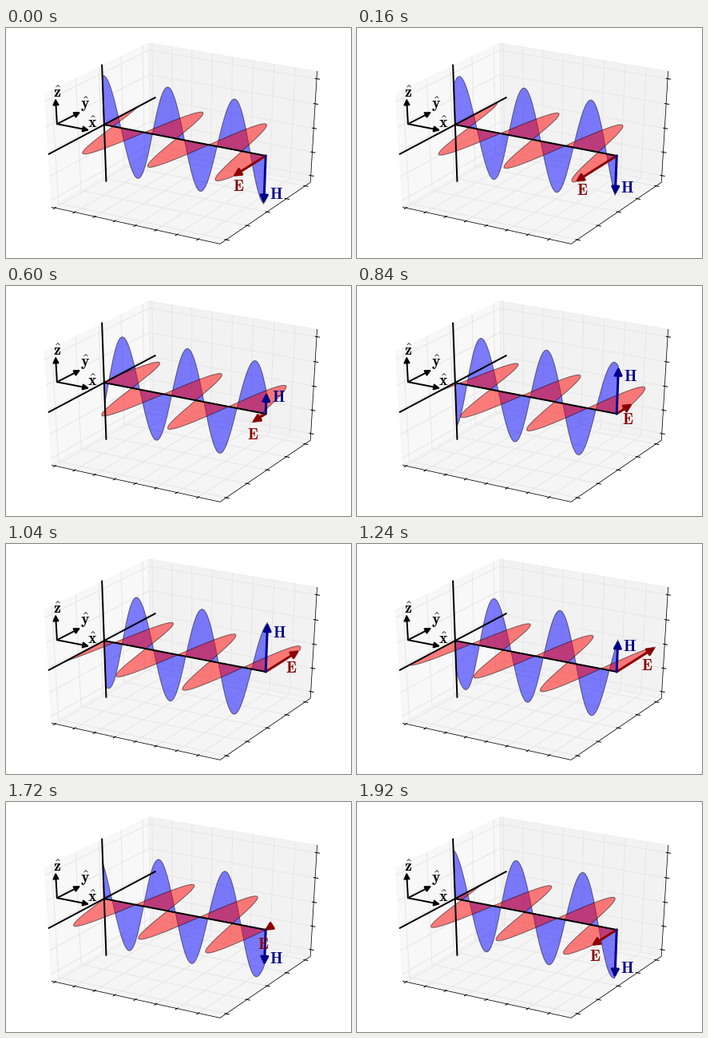
Animation, 432 px wide and 288 px high, one loop 1.96 s. Source, as a matplotlib script:

```python
import numpy as np
import matplotlib.pyplot as plt
from matplotlib.animation import FuncAnimation
from matplotlib.patches import FancyArrowPatch, Polygon

plt.rcParams["mathtext.fontset"] = "cm"

FRAMES, STEPS = 49, 50          # the loop skips one step of a full period
LENGTH, LIMIT = 5 * np.pi, 1.1  # x runs 0..LENGTH, y and z run -LIMIT..LIMIT
DIST = 10
ELEV, AZIM = np.radians([30, -60])


def project(x, y, z):
    """Perspective view of the box, scaled to a unit cube."""
    x = np.asarray(x) / LENGTH - 0.5
    y = np.asarray(y) / (2 * LIMIT)
    z = np.asarray(z) / (2 * LIMIT)
    right = -x * np.sin(AZIM) + y * np.cos(AZIM)
    near = x * np.cos(AZIM) + y * np.sin(AZIM)
    up = z * np.cos(ELEV) - near * np.sin(ELEV)
    depth = DIST - near * np.cos(ELEV) - z * np.sin(ELEV)
    return np.array([right / depth, up / depth])


fig = plt.figure(figsize=(6, 4), dpi=72, facecolor="white")
ax = fig.add_axes([0, 0, 1, 1])
ax.set(xlim=(-0.095, 0.09), ylim=(-0.095, 0.09))
ax.axis("off")


def line(*points, color="black", lw=1.0, zorder=1.0):
    ax.plot(*project(*np.transpose(points)), color=color, lw=lw,
            zorder=zorder, solid_capstyle="projecting")


def pane(grey, *points):
    ax.add_patch(Polygon(project(*np.transpose(points)).T, facecolor=str(grey),
                         edgecolor=str(grey), lw=1, alpha=0.5, zorder=0))


def arrow(start, end, color, lw, scale, zorder):
    patch = FancyArrowPatch(project(*start), project(*end), arrowstyle="-|>",
                            mutation_scale=scale, lw=lw, color=color,
                            shrinkA=0, shrinkB=0, zorder=zorder)
    return ax.add_patch(patch)


def label(text, point, offset, color="black", va="baseline"):
    return ax.annotate(text, project(*point), offset, textcoords="offset points",
                       size=20, color=color, ha="center", va=va, zorder=8)


# Box: panes, grid, edges and ticks
x0, x1 = -LENGTH / 48, LENGTH * 49 / 48
lo, hi = -LIMIT * 25 / 24, LIMIT * 25 / 24
pane(0.95, (x0, lo, lo), (x0, hi, lo), (x0, hi, hi), (x0, lo, hi))
pane(0.90, (x0, hi, lo), (x1, hi, lo), (x1, hi, hi), (x0, hi, hi))
pane(0.925, (x0, lo, lo), (x1, lo, lo), (x1, hi, lo), (x0, hi, lo))

dx, dy = LENGTH / 12, 2 * LIMIT / 12
grid = dict(color="0.9", lw=1, zorder=0.5)
for t in np.arange(0, 15, 2):
    line((t, lo, lo), (t, hi, lo), (t, hi, hi), **grid)
    line((t, lo - 0.2 * dy, lo), (t, lo + 0.1 * dy, lo))
for t in np.linspace(-1, 1, 5):
    line((x1, t, lo), (x0, t, lo), (x0, t, hi), **grid)
    line((x1, hi, t), (x0, hi, t), (x0, lo, t), **grid)
    line((x1 + 0.2 * dx, t, lo), (x1 - 0.1 * dx, t, lo))
    line((x1 + 0.2 * dx, hi, t), (x1 - 0.1 * dx, hi, t))
line((x0, lo, lo), (x1, lo, lo), (x1, hi, lo), (x1, hi, hi), lw=0.75)

# Axes of the wave
line((0, 0, 0), (LENGTH, 0, 0), lw=2, zorder=4)
line((0, -1.2, 0), (0, 1.2, 0), lw=2, zorder=4)
line((0, 0, -1.2), (0, 0, 1.2), lw=2, zorder=4)

# Unit vectors
base = (0, -1, 0.5)
for name, tip, offset in (("x", (np.pi, -1, 0.5), (3.7, 3.5)),
                          ("y", (0, -0.5, 0.5), (6, 4)),
                          ("z", (0, -1, 1), (2, 1.2))):
    arrow(base, tip, "black", 2, 15, 5)
    label(rf"$\mathbf{{\hat{{{name}}}}}$", tip, offset)

# Fields
x = np.linspace(0, LENGTH, 300)
xs = np.concatenate([[0], x, [LENGTH]])
flat = np.zeros_like(xs)
origin = (LENGTH, 0, 0)


def sheet(color, zorder):
    return ax.add_patch(Polygon(np.zeros((3, 2)), facecolor=color, alpha=0.5,
                                edgecolor="black", lw=1, zorder=zorder))


h_sheet, e_sheet = sheet("blue", 2), sheet("red", 3)
e_arrow = arrow(origin, (LENGTH, -1, 0), "darkred", 3, 20, 6)
h_arrow = arrow(origin, (LENGTH, 0, -1), "darkblue", 3, 20, 7)
h_label = label(r"$\mathbf{H}$", origin, (15, -0.5), "darkblue", "center")
e_label = label(r"$\mathbf{E}$", origin, (-1.7, -17.5), "darkred", "center")


def update(i):
    phase = 2 * np.pi * (i + 1) / STEPS
    h = np.cos(x - phase)
    e = np.cos(x - phase + np.pi / 4)
    h_sheet.set_xy(project(xs, flat, np.pad(h, 1)).T)
    e_sheet.set_xy(project(xs, np.pad(e, 1), flat).T)
    h_arrow.set_positions(project(*origin), project(LENGTH, 0, h[-1]))
    e_arrow.set_positions(project(*origin), project(LENGTH, e[-1], 0))
    h_label.xy = project(LENGTH, 0, 0.8 * h[-1])
    e_label.xy = project(LENGTH, 0.8 * e[-1], 0)
    return h_sheet, e_sheet, h_arrow, e_arrow, h_label, e_label


anim = FuncAnimation(fig, update, frames=FRAMES, interval=40, repeat=True,
                     repeat_delay=0, blit=False)
plt.show()
```
